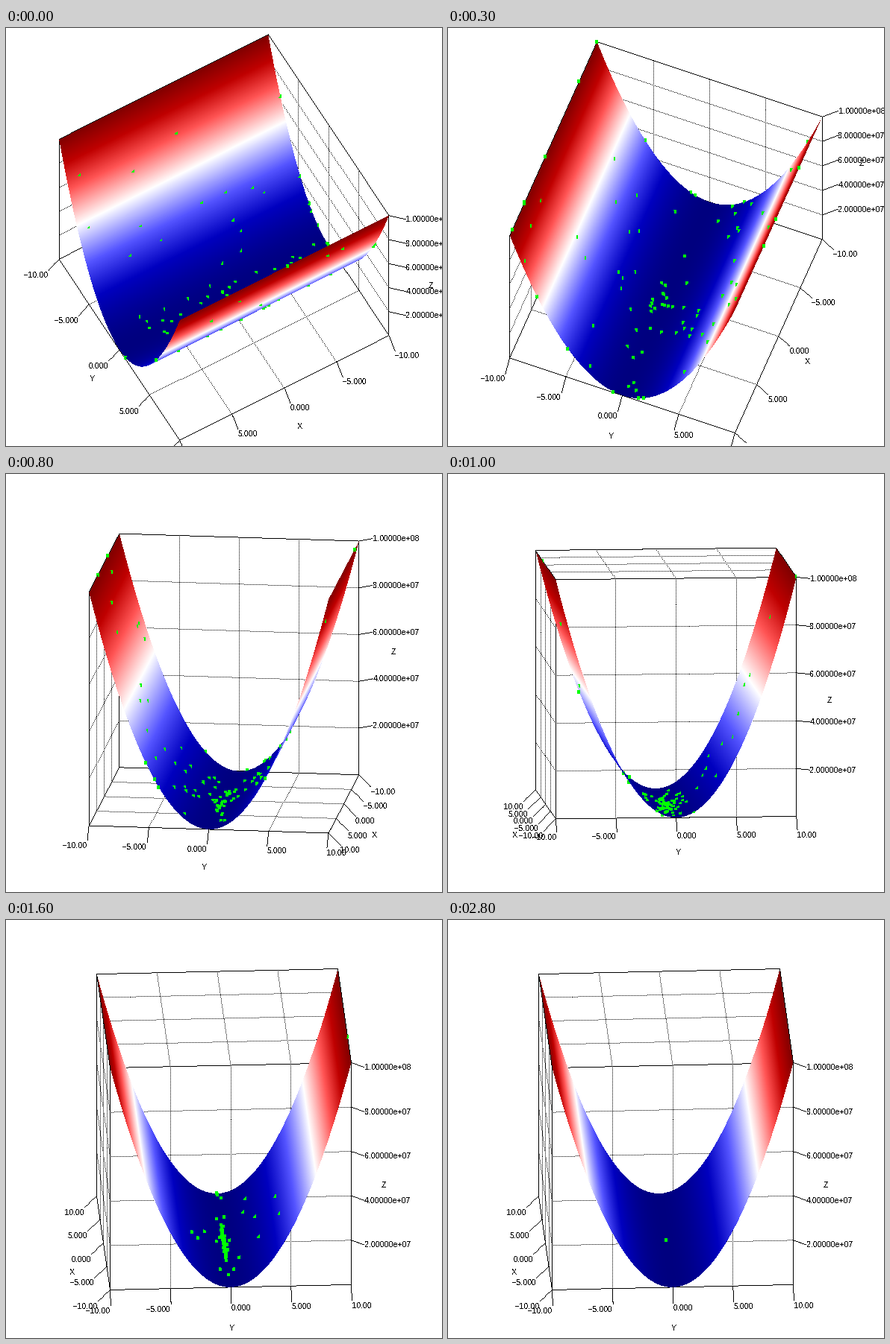
Animation, 584 px wide and 561 px high, one loop 3 s. Source, as a matplotlib script:

```python
import numpy as np
import matplotlib.pyplot as plt
from matplotlib.animation import FuncAnimation

W, H = 584, 561
CENTER = np.array([291.5, 280.5])
SIDE = 323.5
FRAMES, STEP_MS = 30, 100
FONT_PX = 10.8

# Camera path, one entry per step; the view rests after the last one.
AZIMUTH = [60, 47, 34, 21.2, 17, 13, 11, 9, 7.26, 6, 4.8, 3.8, 3.19, 3.19]
ELEVATION = [60.1, 60, 60, 59.4, 54, 46.3, 39.5, 27, 14.1,
             3, -7, -14.5, -20.1, -22.5, -22.95]

QUARTERS = [0, .25, .5, .75, 1]
FIFTHS = [0, .2, .4, .6, .8, 1]
GRID = [QUARTERS, QUARTERS, FIFTHS]

# Diverging map: navy, blue, white, red, maroon.
STOPS = [0, .15, .3, .5, .7, .85, 1]
RED = [0, 0, .33, 1, 1, .75, .5]
GREEN = [0, 0, .33, 1, .33, 0, 0]
BLUE = RED[::-1]
DOT = (0, 1, 0)

# Swarm of particles that swing around the minimum until they settle.
COUNT = 90
rng = np.random.default_rng(11)
settle_y = 6 + 21.5 * rng.beta(1.4, 2.2, COUNT)
settle_x = np.minimum(settle_y * rng.uniform(1, 1.9, COUNT), 27.5)
amp = rng.normal(0, 9, (2, COUNT))
speed = rng.uniform(.5, 1.3, (2, COUNT))
phase = rng.uniform(0, 2 * np.pi, (2, COUNT))
rest = rng.normal(0, 1, (2, COUNT)) * [[3], [.12]]

PY, PX = np.mgrid[0:H, 0:W].astype(float)


def swarm(k):
    """Particle positions inside the unit cube."""
    fade = np.clip(1 - k / np.array([settle_x, settle_y]), 0, 1) ** .6
    grow = np.array([[1], [min(1, .6 + .14 * k)]])
    swing = amp * grow * fade * np.cos(speed * k + phase)
    pos = np.clip(swing + rest * max(0, 1 - k / 28), -10, 10)
    x, y = pos / 20 + .5
    return np.column_stack([x, y, (2 * y - 1) ** 2])


class View:
    def __init__(self, k):
        az = np.radians(np.interp(k, range(len(AZIMUTH)), AZIMUTH))
        el = np.radians(np.interp(k, range(len(ELEVATION)), ELEVATION))
        ca, sa, ce, se = np.cos(az), np.sin(az), np.cos(el), np.sin(el)
        self.above = el > 0
        self.screen = SIDE * np.array([[-sa, ca, 0], [ca * se, sa * se, -ce]])
        self.toward = np.array([ca * ce, sa * ce, se])

    def project(self, p):
        return CENTER + (np.asarray(p, float) - .5) @ self.screen.T


def stroke(img, a, b, step=1):
    n = int(np.abs(b - a).max()) + 1
    x, y = np.rint(np.linspace(a, b, n + 1)[::step]).astype(int).T
    ok = (x >= 0) & (x < W) & (y >= 0) & (y < H)
    img[y[ok], x[ok]] = 0


def draw_walls(img, view):
    for fixed, side in ((0, 0), (1, 0), (2, 0 if view.above else 1)):
        for across in {0, 1, 2} - {fixed}:
            for v in GRID[across]:
                ends = np.zeros((2, 3))
                ends[:, fixed] = side
                ends[:, across] = v
                ends[1, 3 - fixed - across] = 1
                stroke(img, *view.project(ends), step=1 if v in (0, 1) else 2)


def draw_surface(img, view):
    """Cast a ray per pixel onto z = (2y - 1)^2 and return the depth map."""
    (xx, yx, _), (xy, yy, zy) = view.screen
    ox, oy = view.project([0, 0, 0])
    dx, dy, tall, m = PX - ox, PY - oy, -zy, xy / xx
    b = 4 * tall + yy - m * yx
    disc = b * b - 16 * tall * (dy - m * dx + tall)
    root = np.sqrt(np.maximum(disc, 0))
    depth = np.full((H, W), -np.inf)
    # The larger root is nearer to the viewer, so it goes last.
    for sign in (-1, 1):
        y = (b + sign * root) / (8 * tall)
        x = (dx - y * yx) / xx
        hit = (disc >= 0) & (x >= 0) & (x <= 1) & (y >= 0) & (y <= 1)
        x, y = x[hit], y[hit]
        z = (2 * y - 1) ** 2
        img[hit] = np.column_stack([np.interp(z, STOPS, c)
                                    for c in (RED, GREEN, BLUE)])
        depth[hit] = np.column_stack([x, y, z]) @ view.toward
    return depth


def draw_swarm(img, view, depth, k):
    """Stamp squares that face the viewer and sink halfway into the surface."""
    pts = swarm(k)
    near = pts @ view.toward + .0005 + .0008 * k
    px, py = np.rint(view.project(pts)).astype(int).T
    for oy in range(-2, 3):
        for ox in range(-2, 2):
            x, y = np.clip(px + ox, 0, W - 1), np.clip(py + oy, 0, H - 1)
            seen = near >= depth[y, x]
            img[y[seen], x[seen]] = DOT


def number(v):
    return ("\u2212" if v < 0 else "") + f"{abs(v):.3f}"[:5]


def draw_axes(img, view):
    """Draw the ticks and yield text, position and alignment of each label."""
    side = 1 if view.above else 0
    for axis, base in enumerate(([0, side, 0], [side, 0, 0], [0, 1, 0])):
        out = 2 * np.array(base, float) - 1
        out[axis] = 0
        for v in GRID[axis][axis == 2:]:
            p = np.array(base, float)
            p[axis] = v
            start, end = view.project([p, p + .05 * out])
            stroke(img, start, end)
            if axis == 2:
                yield f"{v * 1e8:.5e}", end + [1, 4], "left"
            else:
                align = "left" if end[0] > CENTER[0] else "right"
                yield number(20 * v - 10), end + [0, 10.5], align
        mid = np.array(base, float)
        mid[axis] = .5
        yield "XYZ"[axis], view.project(mid + .128 * out) + [0, 4], "center"


plt.rcParams["text.antialiased"] = False
fig = plt.figure(figsize=(W / 100, H / 100), dpi=100, facecolor="white")
ax = fig.add_axes([0, 0, 1, 1])
picture = ax.imshow(np.ones((H, W, 3)), extent=(0, W, H, 0),
                    interpolation="nearest", aspect="auto")
ax.axis("off")
labels = [ax.text(0, 0, "", family="Liberation Sans", color="black",
                  fontsize=FONT_PX * .72, va="baseline") for _ in range(18)]


def update(k):
    view = View(k)
    img = np.ones((H, W, 3))
    draw_walls(img, view)
    depth = draw_surface(img, view)
    for y in ((0,) if view.above else (0, 1)):
        stroke(img, *view.project([[0, y, 1], [1, y, 1]]))
    draw_swarm(img, view, depth, k)
    for label, (text, pos, align) in zip(labels, draw_axes(img, view)):
        label.set_text(text)
        label.set_position(pos)
        label.set_ha(align)
        label.set_visible(bool(pos[1] < H))
    picture.set_data(img)
    return [picture, *labels]


anim = FuncAnimation(fig, update, frames=FRAMES, interval=STEP_MS,
                     repeat=True, repeat_delay=0, blit=False)
plt.show()
```
